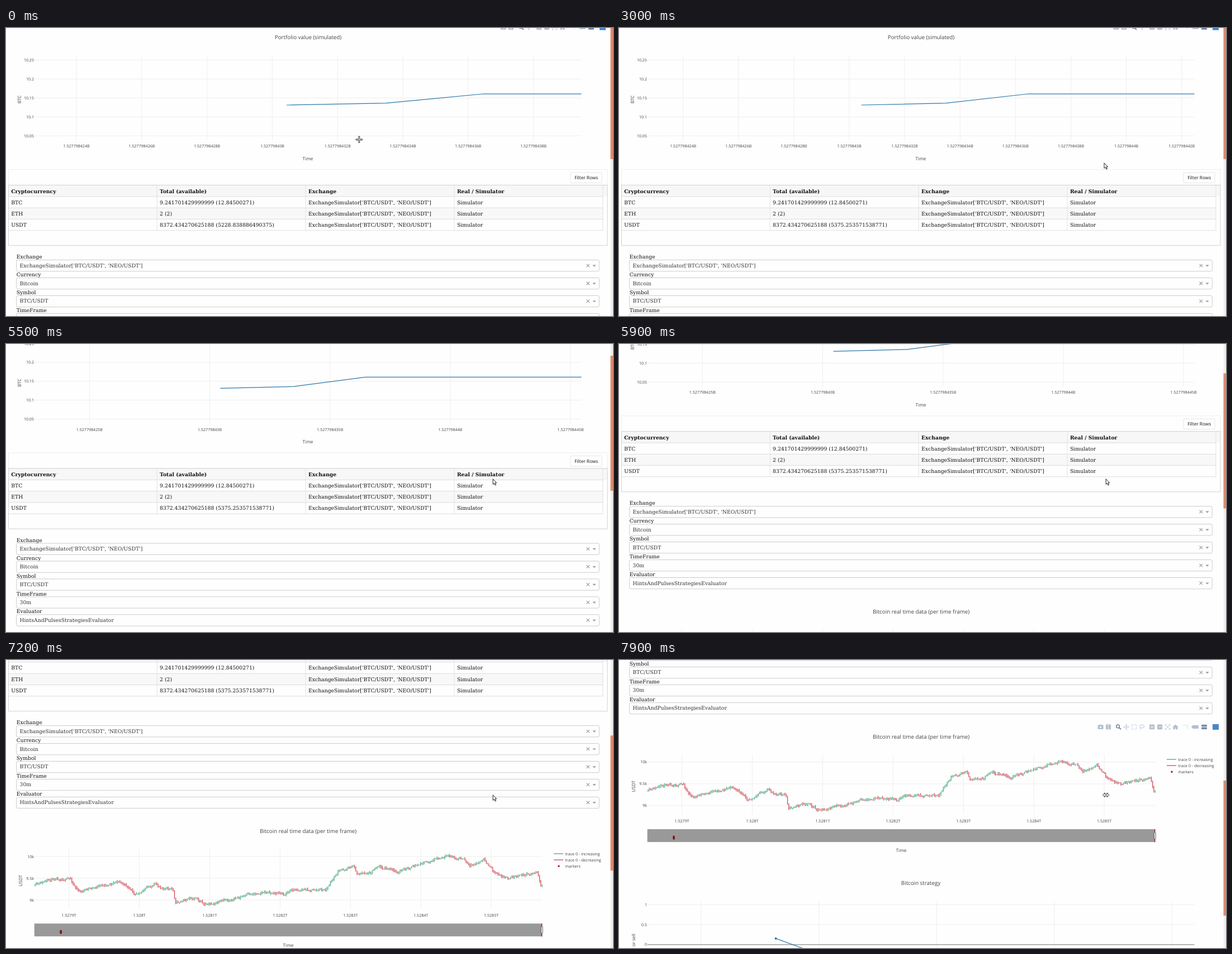
These frames come from a looping animation (1086x516 px, 8 s). An HTML page:

```html
<!DOCTYPE html>
<html lang="en">
<head>
<meta charset="utf-8">
<title>Portfolio dashboard</title>
<style>
  html, body { margin: 0; width: 100%; height: 100%; overflow: hidden; background: #fefefe; }
  svg { display: block; width: 1086px; height: 516px; }
  text { white-space: pre; text-rendering: geometricPrecision; }
  .sans { font-family: "Open Sans", sans-serif; fill: #444; }
  .serif { font-family: "DejaVu Serif", serif; font-size: 9.27px; fill: #111; }
  .button { font-family: "Noto Sans", "Open Sans", sans-serif; font-size: 8.25px; font-weight: 500; fill: #222; }
</style>
</head>
<body>
<svg id="stage" viewBox="0 0 1086 516">
  <g id="page"></g>
  <rect x="1081.5" width="5" height="516" fill="#efefee"/>
  <rect id="thumb" x="1081.5" width="5" height="242" fill="#e08a6d"/>
  <g id="cursor" fill="#fff" stroke="#222"></g>
</svg>
<script>
const LOOP = 8000, TICK = 100;
const BLUE = '#2c78a8', GREEN = '#3f9f78', RED = '#cb3c48', PAPER = '#fefefe';
const $ = id => document.getElementById(id);

// ---- markup helpers ----
const sans = (x, y, s, size = 7.1, anchor = 'start') =>
  `<text class="sans" x="${x}" y="${y + size * .36}" font-size="${size}" text-anchor="${anchor}">${s}</text>`;
const title = (x, y, s) => sans(x, y, s, 9.78, 'middle');
const serif = (x, y, s, extra = '') =>
  `<text class="serif" x="${x}" y="${y + 3.4}" ${extra}>${s}</text>`;
const upright = (x, y, s, anchor = 'middle') =>
  `<g transform="translate(${x} ${y}) rotate(-90)">${sans(0, 0, s, 8.15, anchor)}</g>`;
const line = (x1, y1, x2, y2, color = '#eee', w = 1) =>
  `<path d="M${x1} ${y1}L${x2} ${y2}" stroke="${color}" stroke-width="${w}"/>`;
const rect = (x, y, w, h, fill, stroke = 'none', r = 0) =>
  `<rect x="${x}" y="${y}" width="${w}" height="${h}" rx="${r}" fill="${fill}" stroke="${stroke}"/>`;
const each = (list, fn) => list.map(fn).join('');
const hGrid = (y, dy, labels, x2) => each(labels, (s, i) =>
  line(51, y + i * dy, x2, y + i * dy) + sans(50, y + i * dy, s, 7.1, 'end'));

// ---- chart toolbar ----
const square = '<path d="M-4-4H4V4H-4Z"/>';
const icons = {
  camera: `<path d="M-4.5-3H-2L-1-4H1L2-3H4.5V3.5H-4.5Z"/><circle r="2" cy=".3" fill="${PAPER}"/>`,
  save: square + `<path d="M-2-3H2V-1H-2ZM-2 1H2V3H-2Z" fill="${PAPER}"/>`,
  zoom: '<circle r="2.8" cx="-1" cy="-1" fill="none" stroke-width="1.6"/><path d="M1 1L4.3 4.3" stroke-width="2"/>',
  pan: '<path d="M-4 0H4M0-4V4"/><path d="M-5 0L-3-1.8V1.8ZM5 0L3-1.8V1.8ZM0-5L-1.8-3H1.8ZM0 5L-1.8 3H1.8Z" stroke="none"/>',
  box: '<path d="M-4-4H4V4H-4Z" fill="none" stroke-dasharray="1.6 1.1"/>',
  lasso: '<ellipse rx="4" ry="3" cy="-1" fill="none"/><path d="M-2 1L-2.5 4.5"/>',
  plus: square + `<path d="M-2.5 0H2.5M0-2.5V2.5" stroke="${PAPER}"/>`,
  minus: square + `<path d="M-2.5 0H2.5" stroke="${PAPER}"/>`,
  fit: '<path d="M-3-3L3 3M-3 3L3-3M-4.3-2V-4.3H-2M2-4.3H4.3V-2M4.3 2V4.3H2M-2 4.3H-4.3V2" fill="none"/>',
  home: '<path d="M0-4L4.5 0H3.5V4H1V1H-1V4H-3.5V0H-4.5Z"/>',
  spike: '<path d="M-4-3H2M3-4V4" stroke-dasharray="1.5 1.3"/>',
  tag: '<path d="M-6-.2L-3.5-2.7H6V2.7H-3.5Z"/>',
  tags: '<path d="M-4.5-3.7H4.5V-1H-4.5ZM-4.5 1H4.5V3.7H-4.5Z"/>',
};

// Laid out from the right; "|" marks a gap between groups.
function toolbar(id, y, names) {
  let x = 1047, out = rect(1062, y - 5, 11, 10, '#4a86c8');
  for (const name of names.split(' ').reverse()) {
    if (name === '|') { x -= 4; continue; }
    const c = name === 'zoom' || name === 'tags' ? '#7787a5' : '#b5becd';
    out += `<g transform="translate(${x} ${y})" fill="${c}" stroke="${c}" stroke-width=".9">${icons[name]}</g>`;
    x -= name.startsWith('tag') ? 16.7 : 14;
  }
  return `<g id="${id}">${out}</g>`;
}
const common = '| plus minus fit home | spike tag tags';

// ---- portfolio chart ----
const LO = 422.715, LEFT = 51, RIGHT = 1029.5;
const values = [[430.44, 138], [433.485, 134.7], [436.47, 118], [446, 118]];

function timeAxis(hi, step) {
  const px = v => +(LEFT + (v - LO) * (RIGHT - LEFT) / (hi - LO)).toFixed(2);
  let out = '';
  for (let v = Math.ceil(LO / step) * step; v <= hi; v += step) {
    out += line(px(v), 50, px(v), 202) +
      sans(px(v), 211.5, '1.527798' + String(v).replace(/0$/, '') + 'B', 7.1, 'middle');
  }
  const points = values.map(([v, y]) => `${Math.min(px(v), RIGHT)},${y}`).join(' ');
  return out + `<polyline points="${points}" fill="none" stroke="${BLUE}" stroke-width="1.25"/>`;
}

const portfolio = () =>
  toolbar('tools1', -1.2, 'camera save | zoom pan ' + common) +
  title(540.5, 16.8, 'Portfolio value (simulated)') +
  hGrid(57.5, 33.9, ['10.25', '10.2', '10.15', '10.1', '10.05'], RIGHT) +
  '<g id="axis"></g>' + upright(24, 128, 'BTC') + sans(540, 233.7, 'Time', 8.2, 'middle');

// ---- balance table ----
const pairs = "ExchangeSimulator['BTC/USDT', 'NEO/USDT']";
const heads = ['Cryptocurrency', 'Total (available)', 'Exchange', 'Real / Simulator'];
const coins = [['BTC', '9.241701429999999 (12.84500271)'], ['ETH', '2 (2)'], ['USDT', '']];
const col = i => 4.3 + i * 265.9;
const row = i => 302 + i * 20.25;

const table = () =>
  rect(4.5, 253.5, 1071.5, 28, 'none', '#eee') +
  rect(1010, 259, 56, 18.5, PAPER, '#e6e6e6', 1) +
  '<text class="button" x="1038.2" y="271.2" text-anchor="middle">Filter Rows</text>' +
  rect(4.5, 281.5, 1071.5, 20.5, '#f7f7f7') + rect(4.5, row(1), 1063.5, 20.2, '#f8f8f8') +
  each([0, 1, 2, 3], i => line(4.5, row(i), 1068, row(i), '#ddd')) +
  each([1, 2, 3, 4], i => line(col(i), 281.5, col(i), row(3), '#e2e2e2')) +
  rect(4.5, 281.5, 1071.5, 108.2, 'none', '#d2d2d2') +
  each(heads, (s, i) => serif(col(i) + 4.9, 292.3, s, 'font-weight="bold"')) +
  each(coins, ([coin, total], r) => each([coin, total, pairs, 'Simulator'], (s, c) =>
    serif(col(c) + 4.9, row(r) + 10.1, s, coin === 'USDT' && c === 1 ? 'id="usdt"' : '')));

// ---- selectors ----
const fields = [['Exchange', pairs], ['Currency', 'Bitcoin'], ['Symbol', 'BTC/USDT'],
  ['TimeFrame', '30m'], ['Evaluator', 'HintsAndPulsesStrategiesEvaluator']];
const selects = () => each(fields, ([label, value], i) =>
  `<g transform="translate(0 ${i * 31.95})">` + serif(18.7, 409.8, label) +
  rect(18.7, 415.6, 1042.6, 20.3, PAPER, '#ccc', 2.5) +
  serif(24.5, 425.2, value, 'style="fill:#333"') +
  '<path d="M1038.5 422.8L1044 428.3M1044 422.8L1038.5 428.3" stroke="#999" stroke-width="1.1"/>' +
  '<path d="M1049.4 424.5H1055.6L1052.5 427.7Z" fill="#999"/></g>');

// ---- candle chart: a few turning points joined by noisy bars ----
const turns = [[52, 371], [90, 357], [116, 360], [130, 382], [165, 373], [204, 363], [229, 385],
  [265, 370], [299, 379], [303, 401], [341, 391], [357, 407], [410, 394], [457, 382], [497, 386],
  [513, 378], [572, 379], [594, 346], [622, 335], [628, 349], [650, 348], [665, 335], [700, 347],
  [745, 331], [792, 319], [819, 324], [830, 338], [855, 325], [873, 346], [898, 357], [951, 347],
  [957, 371], [961, 373]];

function trendAt(x) {
  const i = turns.findIndex(p => p[0] > x);
  const [x0, y0] = turns[i - 1], [x1, y1] = turns[i];
  return y0 + (y1 - y0) * (x - x0) / (x1 - x0);
}

function candles() {
  let seed = 11, up = '', down = '', open = 371, drift = 0;
  const rand = () => (seed = (seed * 16807) % 2147483647) / 2147483647;
  for (let x = 52; x < 960; x += 2.268) {
    drift = drift * .6 + (rand() - .5) * 4;
    const close = trendAt(x) + drift;
    const top = Math.min(open, close) - .4 - rand() * 2.6;
    const low = Math.max(open, close) + .4 + rand() * 2.6;
    const bar = `M${x.toFixed(1)} ${top.toFixed(1)}V${low.toFixed(1)}`;
    if (close < open) up += bar; else down += bar;
    open = close;
  }
  return `<path d="${up}" stroke="${GREEN}" stroke-width="1.2"/><path d="${down}" stroke="${RED}" stroke-width="1.2"/>`;
}

const legend = (y, color, s) => line(980, y, 997, y, color, 1.2) + sans(1000.5, y + .2, s);
const days = ['1.5279T', '1.528T', '1.5281T', '1.5282T', '1.5283T', '1.5284T', '1.5285T'];
const market = () => '<g transform="translate(0 331.4)">' +
  title(540.5, 273, 'Bitcoin real time data (per time frame)') +
  each(days, (s, i) => {
    const x = 112.6 + i * 125.92;
    return line(x, 305, x, 412) + sans(x, 423.8, s, 7.1, 'middle');
  }) +
  hGrid(318.6, 39, ['10k', '9.5k', '9k'], 959.5) + candles() + upright(25.8, 362, 'USDT') +
  legend(313.7, GREEN, 'trace 0 - increasing') + legend(324.8, RED, 'trace 0 - decreasing') +
  '<circle cx="989" cy="336" r="1.8" fill="#c0202c"/>' + sans(1000.5, 336, 'markers') +
  rect(50.7, 438.8, 908.6, 23, '#999') + rect(96.4, 450.3, 3.4, 7, '#7c1010', 'none', 1.5) +
  line(958.6, 439, 958.6, 462, '#a01c24', 1.4) + rect(957.3, 444.5, 2.8, 11.5, '#fff', '#555', .8) +
  sans(505, 477.2, 'Time', 8.2, 'middle') + '</g>' +
  toolbar('tools2', 587, 'camera save | zoom pan box lasso ' + common);

// ---- strategy chart ----
const strategy = () =>
  title(540, 866.2, 'Bitcoin strategy') +
  each([0, 1, 2, 3, 4], i => line(147 + i * 210.65, 899, 147 + i * 210.65, 1000)) +
  hGrid(905.5, 35.75, ['1', '0.5', '0'], RIGHT) +
  line(51, 977, RIGHT, 977, '#777', 1.1) + upright(25.8, 957.5, 'Buy or sell', 'end') +
  line(280.5, 966, 360, 995, BLUE, 1.25) + `<circle cx="280.5" cy="966" r="2" fill="${BLUE}"/>`;

$('page').innerHTML = portfolio() + table() + selects() + market() + strategy();

// ---- motion ----
const clamp = u => Math.max(0, Math.min(1, u));
const smooth = u => u * u * (3 - 2 * u);
const easeOut = u => 1 - (1 - u) ** 3;
const during = (t, start, length, ease) => ease(clamp((t - start) / length));

const wheel = [5429, 5852, 6789, 7130, 7490, 7809];
const scrollAt = t => wheel.reduce((sum, start) => sum + 80 * during(t, start, 200, easeOut), 0);

const rangeEnd = t => 439.47 + 2.99 * (during(t, 1800, 500, smooth) + during(t, 4600, 500, smooth));

// Pointer strokes: start, length, dx, dy.
const strokes = [[100, 400, 20, 2], [1000, 400, -2.3, 16.3], [1500, 1200, 204.5, 20.7],
  [2900, 100, 14, 3], [4400, 100, 3.2, 0]];
const pointerAt = t => strokes.reduce(([x, y], [start, length, dx, dy]) => {
  const k = during(t, start, length, smooth);
  return [x + k * dx, y + k * dy];
}, [631.8, 199.8]);

const pointers = {
  cross: '<path d="M-6 0H6M0-6V6" stroke-width="2.8"/><path d="M-5.2 0H5.2M0-5.2V5.2" stroke="#fff" stroke-width="1.1"/>',
  resize: '<path d="M-5.6 0L-2-3.9V-1.4H2V-3.9L5.6 0L2 3.9V1.4H-2V3.9Z"/>',
  arrow: '<path d="M0 0V9.6L2.2 7.6L3.9 11.3L5.4 10.6L3.8 7H6.6Z"/>',
};
const pointerKind = t => t < 1100 ? 'cross' : t < 1600 || t >= 7900 ? 'resize' : 'arrow';

let shown;
function draw() {
  // The screen was sampled ten times a second, so time moves in ticks.
  const t = Math.floor(performance.now() % LOOP / TICK) * TICK;
  if (t !== shown) {
    const scroll = scrollAt(t), hi = rangeEnd(t);
    $('page').setAttribute('transform', `translate(0 ${-scroll})`);
    $('thumb').setAttribute('y', -7 + scroll * .4775);
    $('axis').innerHTML = timeAxis(hi, t < 4700 ? 2 : 5);
    $('usdt').textContent = `8372.434270625188 (${t < 1600 ? '5228.838886490375' : '5375.253571538771'})`;
    $('tools2').setAttribute('visibility', t < 7700 ? 'hidden' : 'visible');
    $('cursor').innerHTML = pointers[pointerKind(t)];
    $('cursor').setAttribute('transform', `translate(${pointerAt(t)})`);
    shown = t;
  }
  requestAnimationFrame(draw);
}
draw();
</script>
</body>
</html>
```
